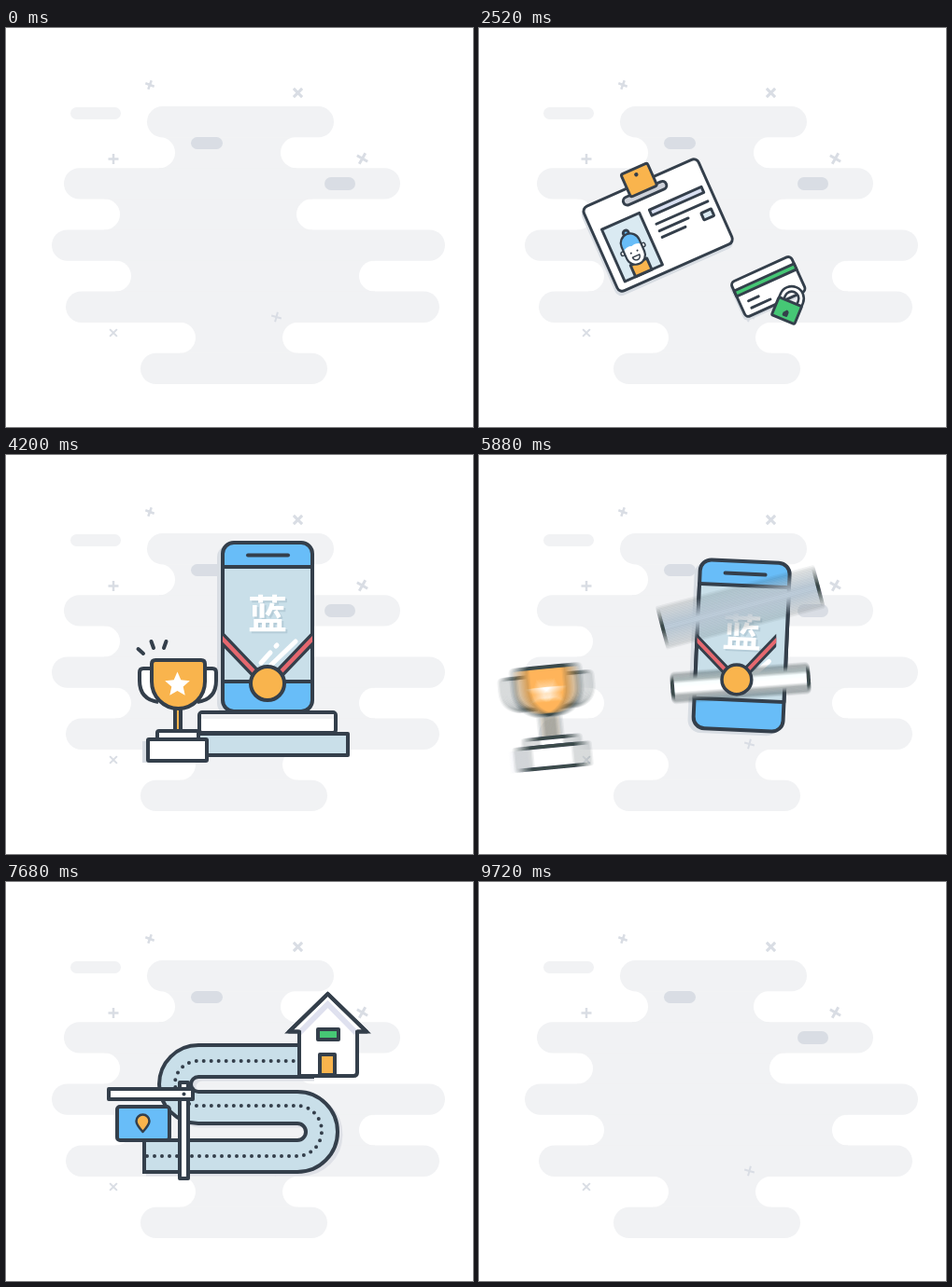
Recreate the animation shown at these times as an HTML page. Size 500 px wide and 428 px high, loop 10000 ms.

```html
<!DOCTYPE html>
<html lang="en">
<head>
<meta charset="utf-8">
<title>Card, trophy and home</title>
<style>
html, body { margin: 0; width: 100%; height: 100%; overflow: hidden; background: #fff; }
svg { display: block; width: 100vw; height: 100vh; }
.o { stroke: #343f4b; stroke-width: 4; stroke-linejoin: round; }
.l { stroke: #343f4b; stroke-width: 4; fill: none; stroke-linecap: round; }
.w { fill: #fff; }
.or { fill: #f9b44d; }
.bl { fill: #68bdf8; }
.pa { fill: #c9dfe9; }
.sk { fill: #daeaf2; }
.gr { fill: #46c775; }
.dk { fill: #343f4b; }
.sh { fill: #d8dde3; }
.road { fill: none; }
.smear { isolation: isolate; }
.smear > use { mix-blend-mode: plus-lighter; }
</style>
</head>
<body>
<svg viewBox="0 0 500 428">
  <defs>
    <path id="lane" d="M146 294H312A26 26 0 0 0 312 242H206A25 25 0 0 1 206 192H330"/>
    <mask id="grow" maskUnits="userSpaceOnUse" x="0" y="0" width="500" height="428">
      <path id="reveal" pathLength="100" fill="none" stroke="#fff" stroke-width="50"
        d="M146 294H312A26 26 0 0 0 312 242H206A25 25 0 0 1 206 192H330"/>
    </mask>
    <clipPath id="screen"><rect x="232" y="120" width="96" height="180"/></clipPath>
  </defs>

  <g id="backdrop"></g>

  <g id="idCard">
    <rect class="sh" x="133" y="144" width="187" height="139" rx="10"/>
    <rect class="o w" x="138" y="142" width="183" height="135" rx="8"/>
    <rect class="o" x="197" y="153" width="68" height="12" rx="6" fill="#cdd1d9"/>
    <rect class="o or" x="210" y="120" width="42" height="36" rx="3"/>
    <circle class="dk" cx="230.5" cy="129" r="3"/>
    <g id="photo">
      <rect class="o sk" x="152" y="182" width="60" height="83"/>
      <rect class="o or" x="169" y="247" width="26" height="18"/>
      <circle class="o bl" cx="182" cy="201" r="4"/>
      <circle class="o w" cx="166" cy="227" r="3" style="stroke-width:2"/>
      <circle class="o w" cx="198" cy="227" r="3" style="stroke-width:2"/>
      <rect class="w" x="168" y="204" width="28" height="46" rx="14"/>
      <path class="bl" d="M168 224V217a14 14 0 0 1 28 0V224Q189 219 182 222Q175 219 168 224Z"/>
      <rect class="o" x="168" y="203" width="28" height="47" rx="14" fill="none" style="stroke-width:3"/>
      <circle class="dk" cx="177" cy="231" r="1.4"/>
      <circle class="dk" cx="187" cy="231" r="1.4"/>
      <path class="o w" d="M176.500 237.500H187.500A5.500 6 0 0 1 176.500 237.500Z" style="stroke-width:2"/>
    </g>
    <g id="lines">
      <rect class="o" x="227" y="184" width="83" height="9" fill="#d8dff1"/>
      <path class="l" d="M228 207H310M228 218H274M228 228H265"/>
      <rect class="o sk" x="294" y="219" width="16" height="11" rx="1"/>
    </g>
  </g>

  <g id="payCard">
    <rect class="sh" x="260" y="244" width="98" height="59" rx="7"/>
    <rect class="o w" x="264" y="242" width="96" height="56" rx="6"/>
    <rect class="o gr" x="264" y="255" width="96" height="9"/>
    <path class="l" d="M277 277H293M277 288H307"/>
  </g>

  <g id="lock">
    <path d="M318 293V287a14 14 0 0 1 28 0V293" fill="none" stroke="#343f4b" stroke-width="11"/>
    <path d="M318 293V287a14 14 0 0 1 28 0V293" fill="none" stroke="#fff" stroke-width="4"/>
    <rect class="o gr" x="314" y="292" width="36" height="28" rx="2"/>
    <path class="dk" d="M332 305a4 4 0 0 1 4 4.500V313a2 2 0 0 1-2 2H330a2 2 0 0 1-2-2V310Z"/>
  </g>

  <g id="phone">
    <rect class="sh" x="226" y="96" width="98" height="184" rx="14"/>
    <rect class="o bl" x="232" y="94" width="96" height="181" rx="12"/>
    <rect class="o pa" x="232" y="120" width="96" height="123"/>
    <path class="l" d="M259 107.500H302"/>
    <g font-family="'Noto Sans CJK SC','Noto Sans CJK',sans-serif" font-weight="900" font-size="42" text-anchor="middle">
      <text x="282" y="188" fill="#b4ccd8">蓝</text>
      <text x="280" y="186" fill="#fff">蓝</text>
    </g>
    <path d="M273 223L283 212M289 205L290 204M284 225L310 200" stroke="#fff" stroke-width="5" stroke-linecap="round"/>
  </g>
  <g id="blueStep"><rect class="o pa" x="194" y="299" width="172" height="23"/></g>
  <g id="whiteStep">
    <rect class="o w" x="207" y="276" width="146" height="22" rx="3"/>
    <rect x="209" y="278" width="142" height="5" fill="#f0f1f3"/>
  </g>
  <g id="medal">
    <g clip-path="url(#screen)">
      <path d="M228 193L270 237M332 193L290 237" stroke="#343f4b" stroke-width="11"/>
      <path d="M228 193L270 237M332 193L290 237" stroke="#e5686f" stroke-width="4.500"/>
    </g>
    <circle class="o or" cx="280" cy="245" r="18"/>
  </g>
  <g id="trophy">
    <path class="sh" d="M146 307H160V330H146Z"/>
    <path class="o w" d="M157 229H147q-4 0-4 4V242q0 20 20 23M211 229H221q4 0 4 4V242q0 20-20 23"/>
    <rect class="o or" x="181" y="268" width="6" height="28"/>
    <path class="o or" d="M156 224q0-4 4-4H209q4 0 4 4V243a28.500 29 0 0 1-57 0Z"/>
    <path id="star" class="w"/>
    <rect class="o w" x="162" y="296" width="44" height="9" rx="2"/>
    <rect class="o w" x="152" y="305" width="63" height="23" rx="1"/>
  </g>
  <path id="ticks" class="l" d="M147 213L141.500 208M158 207L155.500 200M169 207L171.500 200"/>

  <g id="road" mask="url(#grow)" class="road">
    <use href="#lane" stroke="#dfe1e7" stroke-width="37" x="4" y="3"/>
    <use href="#lane" stroke="#343f4b" stroke-width="38"/>
    <path d="M150 294H312A26 26 0 0 0 312 242H206A25 25 0 0 1 206 192H330" stroke="#c9dfe9" stroke-width="30"/>
    <path d="M151 294H312A26 27 0 0 0 312 240H206A25 24 0 0 1 206 192H312" stroke="#343f4b"
      stroke-width="4" stroke-linecap="round" stroke-dasharray="0 8"/>
  </g>
  <g id="house">
    <path class="o w" d="M314 158V208H372q4 0 4-4V158"/>
    <path class="o w" d="M314 160.500H303L344.500 120L386 160.500H376"/>
    <path d="M314 162L344.500 131L375 162" fill="none" stroke="#dfe1ef" stroke-width="6"/>
    <path class="l" d="M314 160.500H303L344.500 120L386 160.500H376" stroke-linejoin="miter"/>
    <path class="l" d="M314 161V208M376 161V204"/>
    <rect class="o gr" x="334" y="158" width="22" height="11"/>
    <rect class="o or" x="336" y="185" width="16" height="22"/>
  </g>
  <g id="board">
    <rect class="o bl" x="119" y="241" width="56" height="36" rx="3"/>
    <path class="o or" d="M146.500 268C142 263 139.500 260 139.500 256.500a7 7 0 0 1 14 0C153.500 260 151 263 146.500 268Z" style="stroke-width:2.500"/>
  </g>
  <g id="post"><rect class="o w" x="186" y="215" width="9" height="103"/></g>
  <g id="beam">
    <rect class="o w" x="110" y="222" width="90" height="11"/>
    <circle class="dk" cx="190.500" cy="227.500" r="2"/>
  </g>
</svg>
<script>
const LOOP = 10000;
const SHUTTER = 20; // ms of travel that a fast part smears over
const COPIES = 15;  // divides 255, so the copies add up to full opacity
const $ = id => document.getElementById(id);
const clamp = x => Math.min(1, Math.max(0, x));
const prog = (t, start, dur) => clamp((t - start) / dur);
const cube = x => x * x * x;
const back = (x, s) => x * x * ((s + 1) * x - s);

// Distance from rest: 1 is away, 0 is in place.
function away(t, inAt, inDur, outAt, outDur) {
  return t < outAt ? cube(1 - prog(t, inAt, inDur)) : cube(prog(t, outAt, outDur));
}

// Share of the path covered while the shutter is open.
function travel(t, times) {
  return Math.abs(away(t + SHUTTER / 2, ...times) - away(t - SHUTTER / 2, ...times));
}

function show(id, on) { $(id).style.display = on ? "" : "none"; }

function put(id, cx, cy, dx, dy, rot = 0, sx = 1, sy = sx) {
  $(id).setAttribute("transform",
    `translate(${cx + dx} ${cy + dy}) rotate(${rot}) scale(${sx} ${sy}) translate(${-cx} ${-cy})`);
}

// Turns a group into a stack of copies that can be spread out.
function makeSmear(id) {
  const group = $(id);
  document.querySelector("defs").insertAdjacentHTML("beforeend", `<g id="${id}Ink">${group.innerHTML}</g>`);
  group.innerHTML = `<use href="#${id}Ink"/>`.repeat(COPIES);
  group.classList.add("smear");
}

function smear(id, x, y) {
  const moving = x + y > 0.5;
  [...$(id).children].forEach((copy, i) => {
    const k = moving ? i / (COPIES - 1) - 0.5 : 0;
    copy.setAttribute("transform", `translate(${x * k} ${y * k})`);
    copy.style.opacity = moving ? 1 / COPIES : 1;
    copy.style.display = moving || i === 0 ? "" : "none";
  });
}

function drawBackdrop() {
  const pill = (x1, x2, y, h, fill) =>
    `<rect x="${x1}" y="${y}" width="${x2 - x1}" height="${h}" rx="${h / 2}" fill="${fill}"/>`;
  const pale = "#f1f2f4", grey = "#d9dde4", h = 33.1;
  const rows = [[151, 351], [181, 294], [62, 422], [122, 311], [49, 470], [134, 378], [64, 464], [203, 296], [144, 344]];
  let gaps = "", bars = "";
  rows.forEach(([a, b], i) => {
    const y = 84 + i * h;
    if (i % 2) {
      gaps += `<rect x="${a - 17}" y="${y - 1}" width="${b - a + 34}" height="${h + 2}" fill="${pale}"/>`
        + pill(a - 50, a, y, h, "#fff") + pill(b, b + 50, y, h, "#fff");
    } else bars += pill(a, b, y, h + 0.2, pale);
  });
  const marks = [[154, 61, 20, 5, 2.5], [312.5, 69.5, 45, 6.5, 3], [115, 140.5, 0, 5.5, 2.5],
    [381.5, 140, 30, 6.5, 3], [289.5, 310, 15, 5.5, 2], [115, 327, 45, 5.5, 2]];
  $("backdrop").innerHTML = gaps + bars + pill(69, 123, 85, 13, pale)
    + pill(198, 232, 117, 13, grey) + pill(341, 374, 160, 14, grey)
    + marks.map(([x, y, r, s, w]) =>
      `<path transform="translate(${x} ${y}) rotate(${r})" d="M${-s} 0H${s}M0 ${-s}V${s}" stroke="${grey}" stroke-width="${w}"/>`).join("");
}

function drawStar() {
  let d = "";
  for (let i = 0; i < 10; i++) {
    const a = i * Math.PI / 5, r = i % 2 ? 6.5 : 14;
    d += (i ? "L" : "M") + (183.5 + r * Math.sin(a)) + " " + (246.5 - r * Math.cos(a));
  }
  $("star").setAttribute("d", d + "Z");
}

function cards(t) {
  const on = t > 20 && t < 3640;
  const s = Math.max(0, (t - 2000) / 1000);
  const size = Math.max(0.05, 1 - 0.51 * s);
  const items = [
    // id, cx, cy, start, rise, turn in, delay out, x and y pull, turn out
    ["idCard", 229.5, 209, 20, 350, -38, 0, -140, 8, -46],
    ["payCard", 312, 270, 180, 250, 40, 0.28, -38, 128, -47],
    ["lock", 332, 297, 280, 200, 40, 0.53, 290, -92, 43]
  ];
  for (const [id, cx, cy, start, rise, turn, wait, px, py, spin] of items) {
    show(id, on && t > start);
    const e = cube(1 - prog(t, start, 760));
    const q = Math.max(0, s - wait) ** 2;
    put(id, cx, cy, q * px, e * rise + q * py, e * turn + s * spin, size);
  }
  const open = 1 - cube(1 - prog(t, 700, 500));
  const fade = prog(t, 2800, 320);
  const shrink = 1 - 0.2 * fade;
  put("photo", 182, 223, 9 * fade, 0, 0, open * shrink, shrink);
  put("lines", 269, 206, 0, 0, 0, open * shrink, shrink);
  for (const id of ["photo", "lines"]) {
    show(id, open > 0);
    smear(id, 16 * fade + 20 * (1 - open), 0);
  }
}

function prizes(t) {
  const step = (id, cy, dist, ...times) => {
    const e = away(t, ...times);
    show(id, e < 1);
    put(id, 280, cy, 0, -e * dist, -0.1 * e * dist);
    smear(id, 0, travel(t, times) * dist);
  };
  step("blueStep", 311, 420, 2811, 600, 5458, 600);
  step("whiteStep", 287, 400, 3038, 560, 5597, 600);

  const ph = away(t, 3120, 500, 5650, 600);
  show("phone", ph < 1);
  put("phone", 280, 184.5, ph * 20, ph * 350, ph * 45);

  const cup = [3100, 500, 5460, 600];
  const tr = away(t, ...cup);
  show("trophy", tr < 1);
  put("trophy", 183.5, 274, -tr * 314, tr * 21, -tr * 16);
  smear("trophy", travel(t, cup) * 380, 0);

  const m = away(t, 3300, 340, 5690, 390);
  const lag = t > 5000 ? -35 * m : 0;
  show("medal", m < 1);
  put("medal", 280, 245, lag, lag, 0, 1 - m);

  const k = t < 5000 ? prog(t, 3960, 240) : 1 - prog(t, 5380, 100);
  show("ticks", k > 0);
  put("ticks", 183, 245, 0, 0, 0, 0.85 + 0.15 * k);
  $("ticks").style.opacity = k;
}

function home(t) {
  const r = t < 8000 ? 1 - cube(1 - prog(t, 6080, 900)) : 1 - cube(prog(t, 9100, 580));
  show("road", r > 0);
  $("reveal").setAttribute("stroke-dasharray", `${r * 100} 200`);

  const h = t < 8000 ? back(1 - prog(t, 6420, 640), 1.4) : back(prog(t, 9320, 390), 1);
  show("house", h < 1);
  put("house", 344, 165, h * 110, h * 320, h * 40);

  const p = away(t, 6700, 500, 9150, 560);
  show("post", p < 1);
  put("post", 190.5, 266, 0, p * 240);

  const b = away(t, 6980, 330, 8800, 300);
  show("beam", b < 1);
  put("beam", 190.5, 227.5, 0, 0, 0, 1 - b, 1);

  const d = away(t, 7120, 320, 8500, 360);
  show("board", d < 1);
  put("board", 147, 234, 0, 0, 2.5 * Math.sin((t - 7680) / 800 * 2 * Math.PI), 1 - d);
}

drawBackdrop();
drawStar();
["photo", "lines", "blueStep", "whiteStep", "trophy"].forEach(makeSmear);

function render(t) {
  cards(t);
  prizes(t);
  home(t);
}

const t0 = performance.now();
function tick() {
  render((performance.now() - t0) % LOOP);
  requestAnimationFrame(tick);
}
tick();
</script>
</body>
</html>
```
